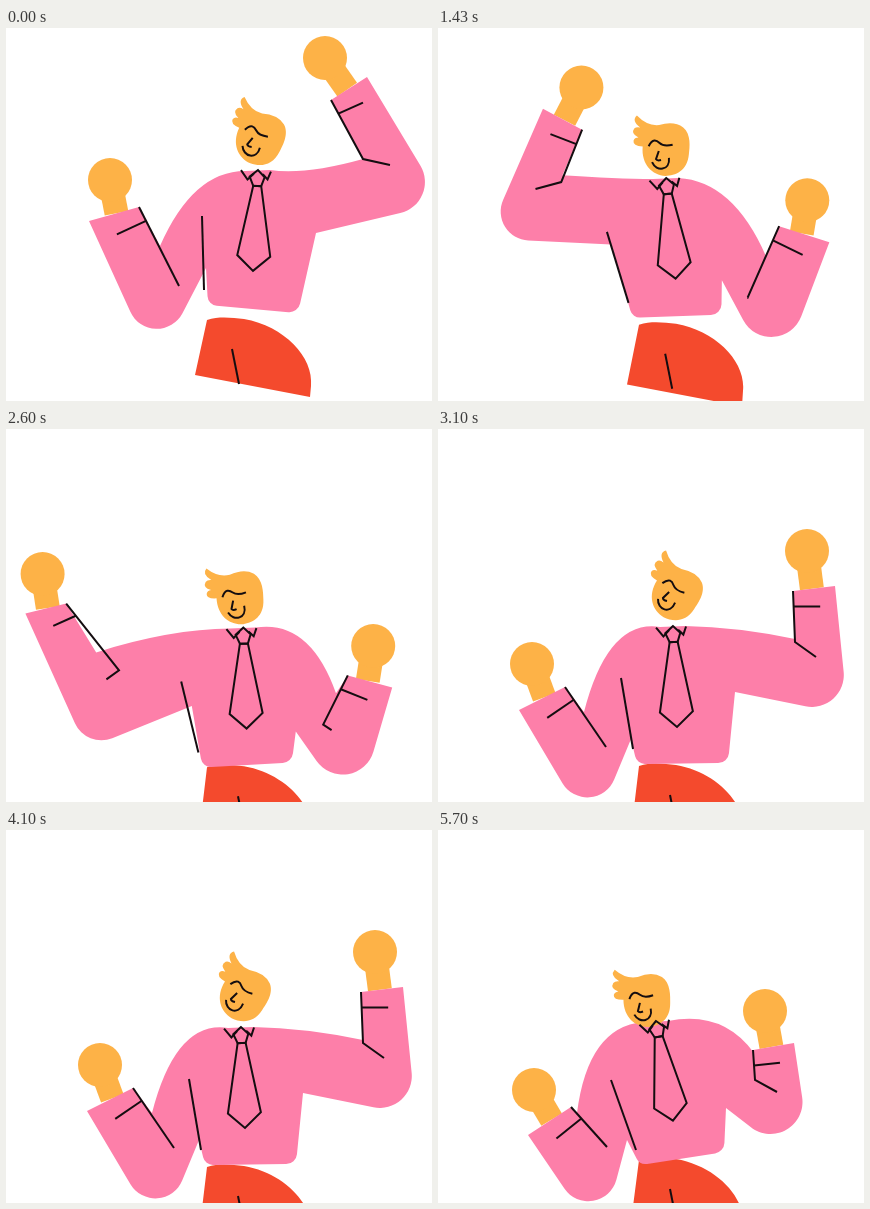
Write an HTML page with a canvas that moves like this. It is 426 by 373 pixels and loops after 5760 ms.

```html
<!DOCTYPE html>
<html lang="en">
<head>
<meta charset="utf-8">
<title>Office dance</title>
<style>
html, body { margin: 0; width: 100%; height: 100%; overflow: hidden; background: #fff; }
canvas { display: block; }
</style>
</head>
<body>
<canvas id="stage" width="426" height="373"></canvas>
<script>
const ctx = document.getElementById('stage').getContext('2d');
const LOOP = 5760, BEATS = 24;
const PINK = '#fd7fa9', SKIN = '#fdb247', RED = '#f44a2d', INK = '#140d10';

// Each arm: hand, cuff outer, cuff inner, notch, bend, crease end, elbow, armpit, shoulder.
// Then hips (left, right), collar, tie tip, side seam, head, [head angle, trouser top].
const jump = [
  104,152, 83,193, 133,179, 154,218, 173,258, 173,258, 149,338, 200,240, 187,143,
  319,30, 361,49, 325,72, 357,131, 357,131, 384,137, 437,175, 310,205, 300,147,
  202,277, 292,285, 252,142, 247,243, 196,188, 253,113, 19,292];
const fall = [
  94,235, 81,281, 127,258, 146,283, 168,318, 168,318, 154,404, 193,310, 170,190,
  369,122, 397,157, 355,162, 357,210, 357,213, 378,228, 410,286, 297,263, 300,198,
  199,335, 290,334, 235,197, 239,298, 183,249, 237,167, 26,337];
const crouch = [
  74,267, 73,313, 112,281, 128,296, 154,319, 154,319, 152,405, 184,298, 150,212,
  333,190, 361,225, 319,229, 318,236, 319,262, 340,276, 377,360, 288,291, 288,190,
  200,345, 287,331, 220,201, 234,302, 174,259, 215,178, 0,340];
const push = [
  96,260, 90,305, 133,277, 139,283, 169,317, 169,317, 162,411, 189,310, 150,197,
  327,181, 356,213, 315,220, 316,223, 317,250, 339,262, 376,346, 288,278, 285,180,
  202,335, 286,322, 218,191, 235,291, 173,250, 209,173, -7,330];
const rise = [
  104,235, 94,280, 139,257, 142,262, 172,303, 172,303, 158,400, 190,290, 150,186,
  325,158, 358,188, 317,200, 318,203, 322,232, 345,242, 394,328, 290,257, 285,164,
  200,319, 288,307, 222,177, 236,276, 175,233, 211,159, -12,315];

const mix = (p, q, k) => p.map((v, i) => v + (q[i] - v) * k);
const lift = (p, dy) => p.map((v, i) => i % 2 && i < 48 ? v + dy : v);

function mirror(p, axis) {
  const flip = (from, to) => p.slice(from, to).map((v, i) => i % 2 ? v : 2 * axis - v);
  const hips = [...flip(38, 40), ...flip(36, 38)];
  return [...flip(18, 36), ...flip(0, 18), ...hips, ...flip(40, 44),
    hips[0] - 18, hips[1] - 86, ...flip(46, 48), 10 - p[48], p[49]];
}
const lean = (p, k) => p.map((v, i) => i % 2 || i > 47 ? v : v - k * (285 - p[i + 1]));

function swingLeft(p, dx, dy) {
  const weight = [1, 1, 1, .6, .4, .4, .4, 0, .1];
  return p.map((v, i) => i < 18 ? v + weight[i >> 1] * (i % 2 ? dy : dx) : v);
}

const keys = [
  [0, jump],
  [1, lift(jump, -6)],
  [4, fall],
  [6, mix(fall, mirror(crouch, 240), .75)],
  [8, mirror(rise, 242)],
  [12, lean(mirror(jump, 243), .12)],
  [13, lift(lean(mirror(jump, 243), .15), -4)],
  [16, swingLeft(mix(mirror(fall, 242), crouch, .4), -62, -35)],
  [18, crouch],
  [19, push],
  [20, rise]
];

function keyAt(i) {
  const n = keys.length, turn = Math.floor(i / n), [t, p] = keys[i - turn * n];
  return [t + turn * BEATS, p];
}

// Periodic cubic through the key poses
function poseAt(beat) {
  let i = keys.length - 1;
  while (keys[i][0] > beat) i--;
  const [t0, p0] = keyAt(i - 1), [t1, p1] = keyAt(i), [t2, p2] = keyAt(i + 1), [t3, p3] = keyAt(i + 2);
  const d = t2 - t1, u = (beat - t1) / d;
  return p1.map((a, j) => {
    const b = p2[j];
    const m = (b - p0[j]) / (t2 - t0) * d, n = (p3[j] - a) / (t3 - t1) * d;
    const c = b - a;
    return a + u * (m + u * (3 * c - 2 * m - n + u * (m + n - 2 * c)));
  });
}

// Drawings run at about 24 per second, shown on 30 per second ticks
function beatAt(ms) {
  const t = Math.floor((ms + 4) * .03) / .03;
  const drift = 1.65 * Math.min(1, t / 2000) + .6 * Math.max(0, (t - 4830) / 870);
  return Math.floor(t * .024 + drift + 1e-3) % BEATS;
}

const between = (a, b, k) => [a[0] + (b[0] - a[0]) * k, a[1] + (b[1] - a[1]) * k];

function line(points, close) {
  ctx.beginPath();
  points.forEach(p => ctx.lineTo(p[0], p[1]));
  if (close) ctx.closePath();
  ctx.stroke();
}

function drawLegs(y) {
  const drop = y - 292, x = 225 + Math.max(0, Math.min(6, drop * .25));
  ctx.fillStyle = RED;
  ctx.beginPath();
  ctx.moveTo(201, y);
  ctx.bezierCurveTo(214, y - 4, 226, y - 2, 238, y - 1);
  ctx.bezierCurveTo(278, y + 6, 308, y + 37, 305, y + 66);
  ctx.lineTo(304, y + 77 + Math.max(0, drop));
  ctx.lineTo(189, y + 55 + Math.max(0, drop));
  ctx.fill();
  line([[x + 1, y + 29], [x + 8, y + 64]]);
}

function drawHand([hand, outer, inner]) {
  const wrist = between(outer, inner, .55);
  ctx.strokeStyle = ctx.fillStyle = SKIN;
  ctx.lineWidth = 24;
  line([hand, wrist]);
  ctx.beginPath();
  ctx.arc(hand[0], hand[1], 22, 0, 7);
  ctx.fill();
  ctx.lineWidth = 2;
  ctx.strokeStyle = INK;
}

function drawShirt(L, R, hipL, hipR, neck) {
  const to = p => ctx.lineTo(p[0], p[1]);
  const round = (a, b, r) => ctx.arcTo(a[0], a[1], b[0], b[1], r);
  ctx.fillStyle = PINK;
  ctx.beginPath();
  ctx.moveTo(...L[7]);
  round(L[6], L[1], 29);
  [L[1], L[2], L[3]].forEach(to);
  ctx.quadraticCurveTo(...L[8], neck[0] - 13, neck[1] + 1);
  to([neck[0] + 12, neck[1]]);
  ctx.quadraticCurveTo(...R[8], ...R[3]);
  [R[2], R[1]].forEach(to);
  round(R[6], R[7], 32);
  to(R[7]);
  round(hipR, hipL, 11);
  round(hipL, L[7], 10);
  ctx.fill();
}

function drawCreases([, outer, inner, , bend, end]) {
  line([inner, bend, end]);
  const len = Math.hypot(bend[0] - inner[0], bend[1] - inner[1]) || 1;
  const start = between(inner, bend, 15.5 / len);
  line([start, [0, 1].map(i =>
    start[i] + .63 * (outer[i] - inner[i]) + .06 * (bend[i] - inner[i]))]);
}

function drawTie(neck, tip) {
  ctx.save();
  ctx.translate(...neck);
  ctx.rotate(Math.atan2(neck[0] - tip[0], tip[1] - neck[1]));
  line([[0, 0], [-8, 7], [-4, 16], [4, 16], [7, 7]], true);
  line([[-4, 16], [4, 16], [16.5, 86], [0, 101], [-16.5, 86]], true);
  line([[-17, 1], [-10, 10], [-4, 4]]);
  line([[13, 1], [10, 9], [5, 4]]);
  ctx.restore();
}

const headPath = new Path2D(`M-28-37 Q-18-26-6-27 Q9-31 18-24 C26-17 24-4 23 3
  C21 20 9 24-1 24 C-14 23-25 12-23-6 Q-33-7-32-12 Q-31-15-27-15
  Q-35-19-31-24 Q-29-26-25-25 Q-34-32-28-37Z`);
const facePath = new Path2D(`M-17-6 C-13-14-9-12-6-9 Q-2-5 7-7
  M-7-1 L-10 7 Q-9 9-5 8 M-14 10 C-10 20 4 19 3 6`);

function drawHead(at, angle) {
  ctx.save();
  ctx.translate(...at);
  ctx.rotate(angle * Math.PI / 180);
  ctx.fillStyle = SKIN;
  ctx.fill(headPath);
  ctx.stroke(facePath);
  ctx.restore();
}

function draw(ms) {
  const pose = poseAt(beatAt(ms));
  const pts = Array.from({ length: 25 }, (_, i) => [pose[2 * i], pose[2 * i + 1]]);
  const L = pts.slice(0, 9), R = pts.slice(9, 18);
  const [hipL, hipR, neck, tip, seam, head, [angle, waist]] = pts.slice(18);
  ctx.fillStyle = '#fff';
  ctx.fillRect(0, 0, 426, 373);
  ctx.strokeStyle = INK;
  ctx.lineWidth = 2;
  drawLegs(waist);
  drawHand(L);
  drawHand(R);
  drawShirt(L, R, hipL, hipR, neck);
  drawCreases(L);
  drawCreases(R);
  line([seam, [hipL[0] - 4, hipL[1] - 15]]);
  drawHead(head, angle);
  drawTie(neck, tip);
}

const start = performance.now();
function tick() {
  draw((performance.now() - start) % LOOP);
  requestAnimationFrame(tick);
}
tick();
</script>
</body>
</html>
```
